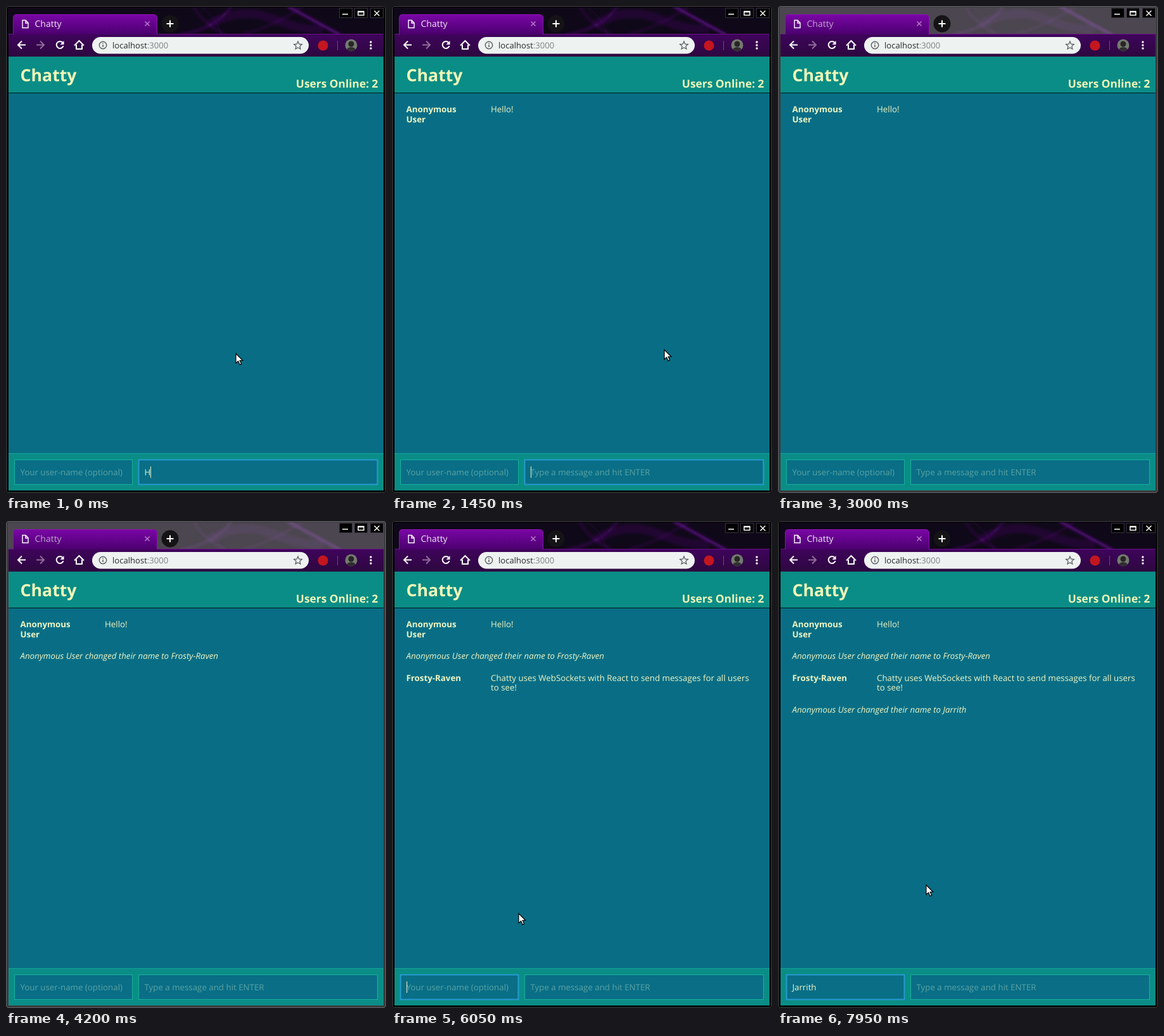
Recreate the animation shown at these times as an HTML page. Size 600 by 770 pixels, loop 8000 ms.

```html
<!DOCTYPE html>
<html lang="en">
<head>
<meta charset="utf-8">
<title>Chatty</title>
<style>
  html, body { margin: 0; width: 100%; height: 100%; overflow: hidden; background: #000; }
  svg { display: block; width: 600px; height: 770px; }
  text { font: 13.3px "Open Sans", sans-serif; fill: #eef5c4; text-rendering: geometricPrecision; white-space: pre; }
  .bold { font-weight: 700; }
  .italic { font-style: italic; }
  .hint { fill: #5ba2a3; }
  .icon { fill: none; stroke: #fff; stroke-width: 2; }
  .frame { fill: #000; stroke: #484848; }
  .strip { fill: #0f0818; }
  .swirls { fill: none; stroke: #6a0f98; }
  .tab-title { font-size: 14px; fill: #f2eaf5; }
  .inactive .frame { fill: #3b3b3d; stroke: #626264; }
  .inactive .strip { fill: #4b464f; }
  .inactive .swirls { stroke: #7c5295; }
  .inactive .tab-title { fill: #c0a6cb; }
  .field { fill: #096e86; stroke: #17b09e; }
  .field.focused { stroke: #2799d0; stroke-width: 2; }
</style>
</head>
<body>
<svg id="stage" viewBox="0 0 600 770">
  <defs>
    <linearGradient id="tabFill" x2="0" y2="1">
      <stop stop-color="#7a06a6"/><stop offset="1" stop-color="#4b006e"/>
    </linearGradient>
    <linearGradient id="barFill" x2="0" y2="1">
      <stop stop-color="#4f0075"/><stop offset="1" stop-color="#2d083f"/>
    </linearGradient>
    <filter id="soft" x="-20%" y="-50%" width="140%" height="200%"><feGaussianBlur stdDeviation="2"/></filter>
    <clipPath id="stripClip"><rect x="3" y="2" width="594" height="42"/></clipPath>
    <clipPath id="avatarClip"><circle cx="545" cy="62" r="9.5"/></clipPath>
  </defs>

  <!-- window and tab strip -->
  <rect class="frame" x=".5" y=".5" width="599" height="769" rx="3"/>
  <rect class="strip" x="3" y="2" width="594" height="42"/>
  <g class="swirls" clip-path="url(#stripClip)">
    <g filter="url(#soft)">
      <path stroke-width="14" opacity=".2" d="M320 30Q370 0 420 20T500 36"/>
      <path stroke-width="4" opacity=".8" d="M444 0Q480 20 528 46"/>
      <path stroke-width="3" opacity=".5" d="M275 46Q335 34 356 0"/>
      <path stroke-width="2" opacity=".45" d="M296 0Q310 28 345 44M375 44Q420 34 470 0"/>
    </g>
    <path opacity=".25" d="M305 0Q330 14 340 44M448 0Q490 26 528 44"/>
  </g>
  <path d="M4 44H11V19Q11 13 17 13H232Q238 13 238 19V44H596V80H4Z" fill="url(#barFill)"/>
  <path d="M11.5 45V19Q11.5 13.5 17 13.5H232Q238.5 13.5 238.5 19V45" fill="url(#tabFill)" stroke="#8a14b0"/>
  <path d="M4 44.5H11M239 44.5H596" stroke="#6a1188"/>
  <path class="icon" style="stroke-width:1.4" d="M26 22.5H31L35 26.5V34.5H26ZM31 22.5V27H35"/>
  <text class="tab-title" x="45.5" y="33">Chatty</text>
  <path d="M219.5 24.5l7 7m0-7l-7 7" stroke="#b77bc9" stroke-width="1.5"/>
  <circle cx="259" cy="28" r="13.5" fill="#151316"/>
  <path class="icon" d="M253.5 28h11M259 22.5v11"/>
  <g fill="#000" stroke="#37313b">
    <rect x="526.5" y="3.5" width="20" height="15"/>
    <rect x="550.5" y="3.5" width="20" height="15"/>
    <rect x="575.5" y="3.5" width="20" height="15"/>
  </g>
  <path d="M531 13h9M556 8.5h9v6h-9ZM556 9.5h9M581.5 7.5l8 8m0-8l-8 8" fill="none" stroke="#fff" stroke-width="1.5"/>

  <!-- toolbar -->
  <path class="icon" d="M31 61.5H19M25 55.5L19 61.5L25 67.5"/>
  <path class="icon" style="stroke:#916c9c" d="M48 61.5H60M54 55.5L60 61.5L54 67.5"/>
  <path class="icon" d="M89.5 58A5.5 5.5 0 1 0 90.5 63"/>
  <path d="M91.5 55V61H85.5Z" fill="#fff"/>
  <path class="icon" d="M108 62.5L115.5 55L123 62.5M111 61V68H120V61"/>
  <rect x="136" y="49" width="342" height="26.5" rx="13.25" fill="#eef3f1"/>
  <circle cx="153" cy="62" r="5.7" fill="none" stroke="#5a5e60" stroke-width="1.4"/>
  <path d="M153 61v4M153 58.3v1.5" stroke="#5a5e60" stroke-width="1.5"/>
  <text x="168" y="67" style="font-size:13.1px;fill:#262a2c">localhost<tspan fill="#7b8082">:3000</tspan></text>
  <path d="M461 56l1.8 4.2 4.5.4-3.4 3 1 4.4-3.9-2.3-3.9 2.3 1-4.4-3.4-3 4.5-.4Z" fill="none" stroke="#5a5e60" stroke-width="1.3"/>
  <circle cx="500.5" cy="62.5" r="8" fill="#c4161f"/>
  <path d="M523.5 55v15" stroke="#75418a"/>
  <g clip-path="url(#avatarClip)">
    <rect x="535" y="52" width="20" height="20" fill="#737b6f"/>
    <circle cx="545" cy="60" r="4.5" fill="#292425"/>
    <ellipse cx="545" cy="72" rx="8" ry="7" fill="#302d30"/>
  </g>
  <g fill="#fff"><circle cx="576" cy="57" r="1.7"/><circle cx="576" cy="62" r="1.7"/><circle cx="576" cy="67" r="1.7"/></g>

  <!-- page -->
  <rect x="4" y="80" width="592" height="686" fill="#096e85"/>
  <rect x="4" y="80" width="592" height="57" fill="#0a8d86"/>
  <path d="M4 137.5H596" stroke="#04181c"/>
  <text class="bold" x="22.6" y="119" style="font-size:26.67px;fill:#f0f8b8">Chatty</text>
  <text class="bold" x="587.5" y="128.7" text-anchor="end" style="font-size:17.33px;fill:#f0f8b8">Users Online: 2</text>
  <g id="log"></g>
  <rect x="4" y="707" width="592" height="59" fill="#0a8d86"/>
  <path d="M4 707.5H596" stroke="#14a39a"/>
  <rect id="nameBox" class="field" x="13.5" y="717.5" width="186" height="39"/>
  <rect id="messageBox" class="field" x="209.5" y="717.5" width="377" height="39"/>
  <text id="nameText" x="22.5" y="742"></text>
  <text id="messageText" x="218.5" y="742"></text>
  <rect id="caret" y="728" width="1" height="18" fill="#f0f3c8"/>

  <path id="arrow" d="M0 0V15.2L3.6 12L6.2 17.6L8.7 16.4L6.2 11H10.8Z" fill="#fff" stroke="#000" stroke-width="1.2"/>
  <g id="beam" fill="none">
    <path d="M-3-7.5Q0-7.5 0-6V6Q0 7.5-3 7.5M3-7.5Q0-7.5 0-6M3 7.5Q0 7.5 0 6" stroke="#fff" stroke-width="3"/>
    <path d="M-3-7.5Q0-7.5 0-6V6Q0 7.5-3 7.5M3-7.5Q0-7.5 0-6M3 7.5Q0 7.5 0 6" stroke="#000" stroke-width="1.3"/>
  </g>
</svg>
<script>
const LOOP = 8000;
const BLUR = 1950, REFOCUS = 5800;
const $ = id => document.getElementById(id);

// [time shown, x, baseline, style, text]
const log = [
  [1100, 22.5, 168, "bold", "Anonymous"],
  [1100, 22.5, 183.5, "bold", "User"],
  [1100, 156, 168, "", "Hello!"],
  [3200, 22.5, 217.5, "italic", "Anonymous User changed their name to Frosty-Raven"],
  [4600, 22.5, 252.5, "bold", "Frosty-Raven"],
  [4600, 156, 252.5, "", "Chatty uses WebSockets with React to send messages for all users"],
  [4600, 156, 268, "", "to see!"],
  [7600, 22.5, 302.5, "italic", "Anonymous User changed their name to Jarrith"]
].map(([time, x, y, style, content]) => {
  const node = document.createElementNS("http://www.w3.org/2000/svg", "text");
  node.setAttribute("x", x);
  node.setAttribute("y", y);
  node.setAttribute("class", style);
  node.textContent = content;
  $("log").append(node);
  return { time, node };
});

const message = { text: "Hello!", keys: [0, 150, 300, 450, 600, 850], sent: 1100 };
const userName = { text: "Jarrith", keys: [6500, 6650, 6750, 6900, 7000, 7150, 7300], sent: Infinity };

// [time, x, y] of the pointer
const pointerPath = [
  [0, 363, 549.5], [1150, 363, 549.5], [1450, 430, 543.5], [1750, 565, 535], [1850, 606, 533],
  [4750, 606, 640], [5000, 370, 695], [5250, 83, 725], [5400, 55, 734],
  [5800, 57, 734], [6050, 200, 620.5], [6400, 234, 575.5], [LOOP, 234, 575.5]
];

function pointerAt(t) {
  const i = pointerPath.findIndex(p => p[0] > t);
  const [t0, x0, y0] = pointerPath[i - 1], [t1, x1, y1] = pointerPath[i];
  const u = (t - t0) / (t1 - t0);
  return [x0 + (x1 - x0) * u, y0 + (y1 - y0) * u];
}

function typed(entry, t) {
  return t < entry.sent ? entry.text.slice(0, entry.keys.filter(k => k <= t).length) : "";
}

function fillField(node, value, hint) {
  node.textContent = value || hint;
  node.classList.toggle("hint", !value);
}

function show(node, visible) {
  node.style.display = visible ? "" : "none";
}

function sampleTime(t) {
  const rest = t % 200;
  return t - rest + (rest < 50 ? 0 : rest < 150 ? 50 : 150);
}

function draw(t) {
  const active = t < BLUR || t >= REFOCUS;
  const inName = t >= REFOCUS;
  $("stage").classList.toggle("inactive", !active);
  $("nameBox").classList.toggle("focused", active && inName);
  $("messageBox").classList.toggle("focused", active && !inName);
  log.forEach(line => show(line.node, t >= line.time));

  fillField($("nameText"), typed(userName, t), "Your user-name (optional)");
  fillField($("messageText"), typed(message, t), "Type a message and hit ENTER");

  const entry = inName ? userName : message;
  const node = $(inName ? "nameText" : "messageText");
  const lastEdit = Math.max(...[...entry.keys, entry.sent, REFOCUS].filter(k => k <= t));
  const width = typed(entry, t) ? node.getComputedTextLength() : 0;
  $("caret").setAttribute("x", Math.round(+node.getAttribute("x") + width));
  show($("caret"), active && (t - lastEdit) % 1000 < 500);

  const [x, y] = pointerAt(t);
  const overField = y > 717 && y < 757 && (x > 13 && x < 200 || x > 209 && x < 587);
  for (const id of ["arrow", "beam"]) {
    $(id).setAttribute("transform", `translate(${x} ${y})`);
    show($(id), (id === "beam") === overField);
  }
}

const start = performance.now();
function tick() {
  draw(sampleTime((performance.now() - start) % LOOP));
  requestAnimationFrame(tick);
}
tick();
</script>
</body>
</html>
```
